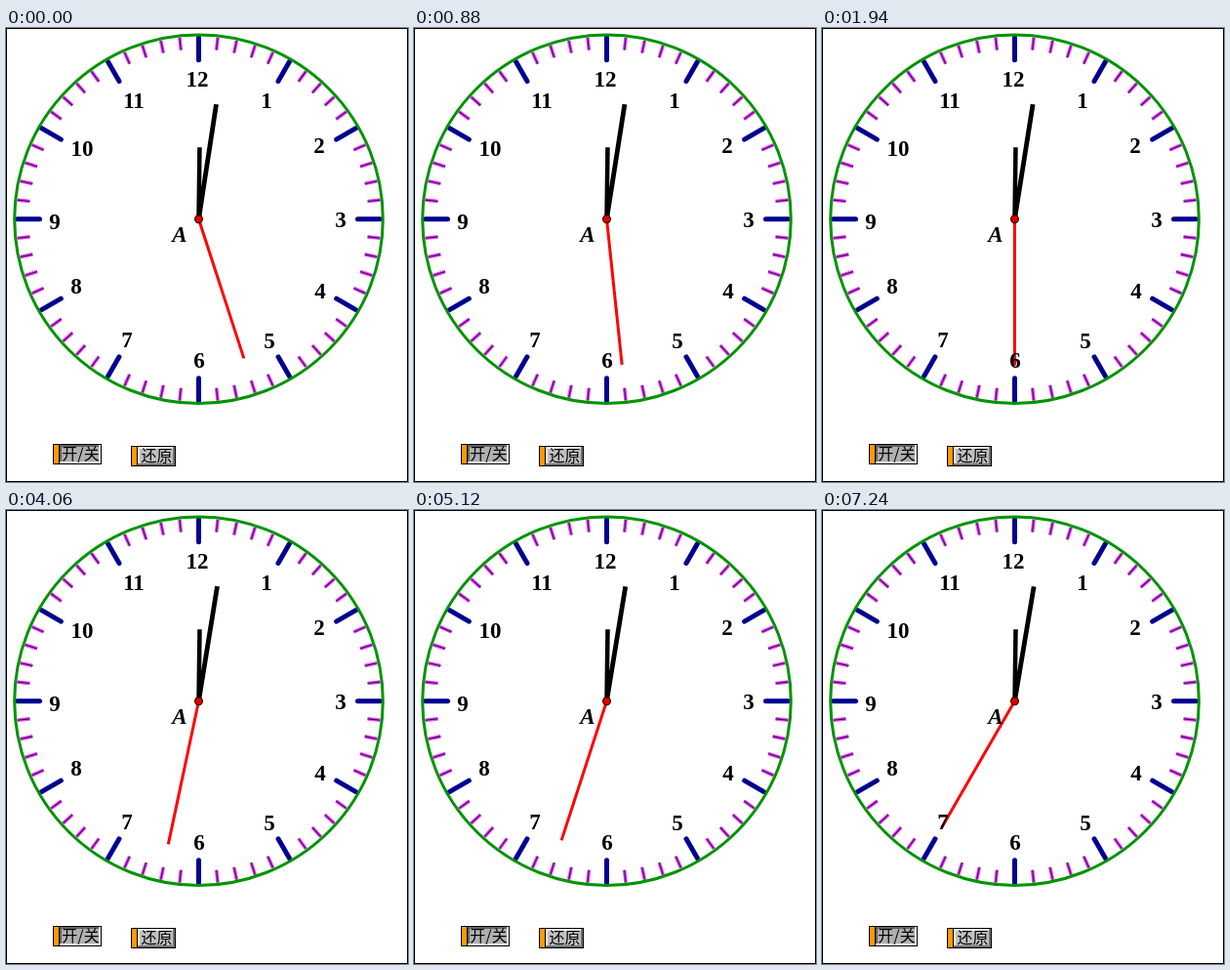
These frames come from a looping animation (412 by 465 pixels, 8 s). An HTML page:

```html
<!DOCTYPE html>
<html lang="zh">
<head>
<meta charset="utf-8">
<title>Clock</title>
<style>
  html, body { margin: 0; width: 100%; height: 100%; overflow: hidden; background: #fff; }
  svg { display: block; }
  .digits { font: bold 23px "Liberation Serif", serif; text-anchor: middle; }
  .label { font: 16px "Noto Sans CJK SC", "Noto Sans CJK", sans-serif; text-anchor: middle; }
</style>
</head>
<body>
<svg width="412" height="465" viewBox="0 0 412 465">
  <rect x=".5" y=".5" width="411" height="464" fill="#fff" stroke="#000"/>
  <g id="dial" transform="translate(197.5 195.7)">
    <g id="ticks"></g>
    <circle r="188.8" fill="none" stroke="#009400" stroke-width="3"/>
    <path id="hour" d="M0 0V-73.5" stroke="#000" stroke-width="4.5"/>
    <path id="minute" d="M0 0V-119" stroke="#000" stroke-width="4.8"/>
    <path id="second" d="M0 0V-150" stroke="#f00" stroke-width="3"/>
    <circle r="3.9" fill="#e00000" stroke="#300" stroke-width="1.2"/>
  </g>
  <g id="digits" class="digits">
    <text x="178" y="218.5" font-style="italic">A</text>
  </g>
  <g id="buttons"></g>
</svg>
<script>
const $ = id => document.getElementById(id);

function add(parent, tag, attrs, text = '') {
  const el = document.createElementNS('http://www.w3.org/2000/svg', tag);
  for (const key in attrs) el.setAttribute(key, attrs[key]);
  el.textContent = text;
  parent.append(el);
  return el;
}

function tick(angle, inner, outer, color, width, cap = 'butt') {
  add($('ticks'), 'path', {
    d: `M0 ${-inner}V${-outer}`, transform: `rotate(${angle})`,
    stroke: color, 'stroke-width': width, 'stroke-linecap': cap
  });
}

for (let i = 0; i < 60; i++) {
  if (i % 5 === 0) {
    tick(i * 6, 163, 186, '#000090', 5, 'round');
  } else {
    tick(i * 6, 174, 187, '#f040f8', 3.6);
    tick(i * 6, 174, 187, '#301060', 1.1);
  }
}

// Centres of the numerals, from 1 to 12
const spots = [[267, 74], [321, 120], [343, 196], [322, 269], [270, 320], [198, 340],
               [124, 319], [72, 264], [50, 198], [78, 123], [131, 74], [196, 52]];
spots.forEach(([x, y], i) => add($('digits'), 'text', { x, y: y + 7.7 }, i + 1));

function button(x, y, width, label, pressed) {
  const g = add($('buttons'), 'g', { transform: `translate(${x} ${y})` });
  const box = (x, y, width, height, fill) => add(g, 'rect', { x, y, width, height, fill });
  const [lit, shade] = pressed ? ['#606060', '#e8e8e8'] : ['#f0f0f0', '#707070'];
  box(0, 0, width, 21, '#000');
  box(1, 1, 5, 19, '#ff9900');
  box(7, 1, width - 8, 19, shade);
  box(7, 1, width - 10, 17, lit);
  box(9, 3, width - 12, 15, pressed ? '#b0b0b0' : '#c0c0c0');
  add(g, 'text', { class: 'label', x: width / 2 + 3.5, y: 16 }, label);
}
button(48, 426, 50, '开/关', true);
button(128, 428, 46, '还原', false);

const LOOP = 8000, FIRST_SECOND = 27;
const steps = [100, 880, 1940, 3000, 4060, 5120, 6180, 7240];
const turn = (id, angle) => $(id).setAttribute('transform', `rotate(${angle})`);

function draw() {
  const time = performance.now() % LOOP;
  const seconds = FIRST_SECOND + steps.filter(step => time >= step).length;
  const minutes = 1 + seconds / 60;
  turn('second', seconds * 6);
  turn('minute', minutes * 6);
  turn('hour', minutes / 2);
  requestAnimationFrame(draw);
}
draw();
</script>
</body>
</html>
```
